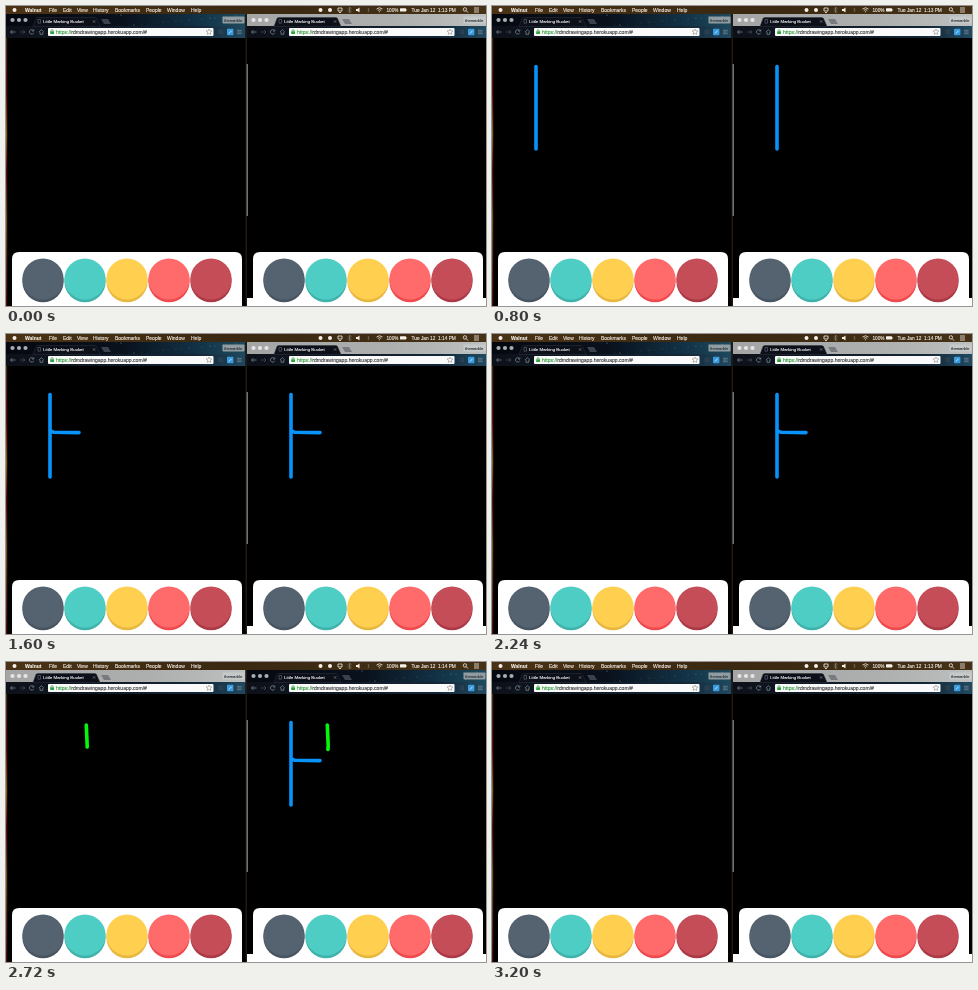
An HTML page for the animation above (6.56 s loop, 480 by 300 pixels).

```html
<!DOCTYPE html>
<html lang="en">
<head>
<meta charset="utf-8">
<title>Shared drawing</title>
<style>
html, body { margin: 0; width: 100%; height: 100%; overflow: hidden; background: #000; }
svg { display: block; width: 100vw; height: 100vh; }
text { font: 5px "Liberation Sans", Arial, sans-serif; white-space: pre; }
.stroke { fill: none; stroke-width: 3.6; stroke-linecap: round; stroke-linejoin: round; }
.icon { fill: none; stroke-width: .8; }
</style>
</head>
<body>
<svg id="stage" viewBox="0 0 480 300">
  <defs>
    <linearGradient id="menu"><stop stop-color="#4b3215"/><stop offset=".5" stop-color="#3a2811"/><stop offset="1" stop-color="#443116"/></linearGradient>
    <linearGradient id="desk" x2="0" y2="1">
      <stop stop-color="#4a2c12"/><stop offset=".2" stop-color="#6a120a"/><stop offset=".36" stop-color="#8f6420"/>
      <stop offset=".5" stop-color="#5c0f0a"/><stop offset=".68" stop-color="#7a5220"/><stop offset="1" stop-color="#4f0e0a"/>
    </linearGradient>
    <linearGradient id="stripOn"><stop stop-color="#05080f"/><stop offset=".5" stop-color="#0a121e"/><stop offset=".8" stop-color="#123246"/><stop offset="1" stop-color="#1d4a5c"/></linearGradient>
    <linearGradient id="stripOff"><stop stop-color="#a5a5a6"/><stop offset=".6" stop-color="#adaeae"/><stop offset="1" stop-color="#bcc0bf"/></linearGradient>
    <linearGradient id="bar"><stop stop-color="#0d1018"/><stop offset=".8" stop-color="#142636"/><stop offset="1" stop-color="#1f4a62"/></linearGradient>
  </defs>
</svg>
<script>
const LOOP = 6560, STEP = 160, OFFSET = 241;
const BLUE = "#0893fb", GREEN = "#05f80a";
const stage = document.getElementById("stage");

function add(parent, tag, attrs, content) {
  const el = document.createElementNS("http://www.w3.org/2000/svg", tag);
  for (const k in attrs) el.setAttribute(k, attrs[k]);
  if (content) el.textContent = content;
  return parent.appendChild(el);
}
const rect = (p, x, y, width, height, fill, rx = 0) => add(p, "rect", { x, y, width, height, fill, rx });
const dot = (p, cx, cy, r, fill) => add(p, "circle", { cx, cy, r, fill });
const icon = (p, d, stroke, width = .8) => add(p, "path", { d, stroke, class: "icon", style: `stroke-width:${width}` });
const label = (p, x, y, s, fill, size = 5, weight = 400) =>
  add(p, "text", { x, y, fill, stroke: fill, "stroke-width": .12, style: `font-size:${size}px;font-weight:${weight}` }, s);

function menuBar() {
  const ink = "#f6f0e8", dim = "#85796a";
  rect(stage, 0, 0, 480, 8, "url(#menu)");
  dot(stage, 8.5, 4, 2, ink);
  label(stage, 19, 5.6, "Walnut", ink, 5, 700);
  const items = { File: 43, Edit: 57, View: 71, History: 87, Bookmarks: 109, People: 140, Window: 161, Help: 185 };
  for (const name in items) label(stage, items[name], 5.6, name, ink);
  dot(stage, 314.5, 4, 2, ink);
  dot(stage, 324, 4, 2, ink);
  icon(stage, "M332 2h4v3h-4zM333 6.5h2", ink);
  icon(stage, "M342 2.5l3 3-1.5 1.5v-6l1.5 1.5-3 3", dim);
  add(stage, "path", { d: "M350 3h1.5l2-1.5v5l-2-1.5h-1.5z", fill: ink });
  icon(stage, "M362 2q2 2 0 4", dim);
  icon(stage, "M370.5 3q3-2.5 6 0M371.8 4.4q1.7-1.4 3.4 0M373 5.8h1", ink);
  label(stage, 380.5, 5.6, "100%", ink, 4.7);
  rect(stage, 394, 2.3, 6, 3.3, ink, .5);
  rect(stage, 400.3, 3.2, .6, 1.5, ink);
  label(stage, 405.5, 5.6, "Tue Jan 12", ink, 4.8);
  icon(stage, "M460.6 3.4a1.7 1.7 0 1 1-3.4 0a1.7 1.7 0 1 1 3.4 0M460.2 4.7l1.8 1.9", ink);
  icon(stage, "M468 2h5M468 4h5M468 6h5", ink);
  return label(stage, 432, 5.6, "", ink, 4.8);
}

// Window buttons and tab strip backdrop, the only parts that follow focus
function strip(win, on) {
  const g = add(win, "g", {});
  rect(g, 0, 8, 239.5, 13, on ? "url(#stripOn)" : "url(#stripOff)");
  if (on)
    for (let i = 0; i < 16; i++)
      dot(g, 110 + i * 47 % 128, 9 + i * 7 % 11, .3 + i % 3 * .12, "#5f8796");
  for (const x of [6.5, 13, 19.5]) dot(g, x, 14, 2.1, on ? "#a9aeb5" : "#e4e5e6");
  add(g, "path", { d: "M95 13h7l3 5h-7z", fill: on ? "#3b424e" : "#777b80" });
  rect(g, 216.5, 10.5, 22, 7, on ? "#8f9ca1" : "#c6c9c8", .8);
  label(g, 218, 15.5, "themarble", "#333a40", 4.1);
  return g;
}

function toolbar(g) {
  const ink = "#76838f", dim = "#3f4a56";
  rect(g, 0, 20, 239.5, 12, "url(#bar)");
  add(g, "path", {
    d: "M27 20.5L30 12.5Q30.5 11.5 32 11.5H88Q90 11.5 90.5 12.5L94 20.5Z",
    fill: "#0d1018", stroke: "#2c3340", "stroke-width": .5
  });
  icon(g, "M32 13.5h2.5v3.7H32z", "#8d98aa", .4);
  label(g, 37, 17.2, "Little Marking Bucket", "#eef0f4", 4.4);
  icon(g, "M87 14.4l2.2 2.2M89.2 14.4l-2.2 2.2", "#a6acb6", .5);
  icon(g, "M9.5 26h-5M6.5 24l-2 2 2 2", ink);
  icon(g, "M14 26h5M17 24l2 2-2 2", dim);
  icon(g, "M27.5 24.7a2.2 2.2 0 1 0 .2 2M27.8 23.5v1.6h-1.6", ink);
  icon(g, "M33 26l2.4-2.3 2.4 2.3M34 26v2.3h2.8V26", ink);
  rect(g, 42, 22, 165.5, 8, "#fafafa", 1);
  rect(g, 44.2, 25.2, 3.8, 2.9, "#2fa33c", .4);
  icon(g, "M45 25.2v-.8q1.1-1.6 2.2 0v.8", "#2fa33c");
  const url = label(g, 50, 27.6, "", "#3c3c3c", 5.08);
  add(url, "tspan", { fill: "#2c9a3a", stroke: "#2c9a3a" }, "https://");
  add(url, "tspan", {}, "rdmdrawingapp.herokuapp.com/#");
  icon(g, "M203 23l.9 1.8 2 .2-1.5 1.4.4 2-1.8-1-1.8 1 .4-2-1.5-1.4 2-.2z", "#777", .5);
  icon(g, "M213.3 24.2h3v3.4h-3z", dim);
  rect(g, 221, 22.8, 6.4, 6.4, "#3c9ade", .8);
  icon(g, "M223 27.4l2.6-2.7", "#f2f8fd");
  icon(g, "M231 24.3h4.6M231 26h4.6M231 27.7h4.6", ink);
}

function palette(win) {
  const colors = [["#556270", "#485562"], ["#4ecdc4", "#3fb3ab"], ["#ffd050", "#e8b740"],
                  ["#ff6b6b", "#f0494e"], ["#c44d58", "#ab3a46"]];
  add(win, "path", { d: "M6 300V253q0-7 7-7H229q7 0 7 7V300Z", fill: "#fff" });
  colors.forEach(([face, side], i) => {
    dot(win, 37 + 42 * i, 275.6, 20.6, side);
    dot(win, 37 + 42 * i, 273, 20.6, face);
  });
}

function makeWindow(x, bottom) {
  const g = add(stage, "g", { transform: `translate(${x})` });
  rect(g, 0, 32, 240, 268, "#000");
  rect(g, 0, 292, 239.5, 8, bottom);
  const on = strip(g, true), off = strip(g, false);
  toolbar(g);
  const stroke = color => add(g, "path", { class: "stroke", stroke: color });
  const win = { on, off, stem: stroke(BLUE), arm: stroke(BLUE), line: stroke(GREEN) };
  palette(g);
  return win;
}

const left = makeWindow(0, "#000"), right = makeWindow(OFFSET, "#fff");
rect(stage, 0, 32, 1.2, 268, "url(#desk)");
rect(stage, 239.5, 8, 1.5, 292, "#231910");
rect(stage, 240.6, 58, 1.2, 152, "#8d8d8d");
const clock = menuBar();

// Value at t along [time, value] keys, held at both ends
function along(keys, t) {
  if (t <= keys[0][0]) return keys[0][1];
  for (let i = 1; i < keys.length; i++) {
    const [a, u] = keys[i - 1], [b, v] = keys[i];
    if (t <= b) return u + (v - u) * (t - a) / (b - a);
  }
  return keys[keys.length - 1][1];
}

// Polyline cut where the chosen axis (0 = x, 1 = y) reaches the tip
function trace(points, axis, tip) {
  const out = [points[0]];
  for (let i = 1; i < points.length; i++) {
    const p = points[i - 1], q = points[i];
    if (q[axis] >= tip) {
      const k = (tip - p[axis]) / (q[axis] - p[axis]);
      out.push([p[0] + (q[0] - p[0]) * k, p[1] + (q[1] - p[1]) * k]);
      break;
    }
    out.push(q);
  }
  return "M" + out.join("L");
}

const STEM = [[44, 60.5], [44, 143]];
const ARM = [[44.5, 96.8], [48, 98.3], [73, 98.6]];
const LINE = [[80.3, 63], [81.2, 84], [80, 98], [82.5, 106], [82.3, 125]];
const stemTip = [[160, 66], [320, 87], [480, 111], [640, 134], [800, 143]];
const armTip = [[960, 50], [1120, 59.5], [1280, 66], [1440, 73]];
const lineTip = [[2560, 68], [2720, 85], [2880, 104], [3040, 122]];

function show(el, visible, d) {
  el.style.display = visible ? "" : "none";
  if (d) el.setAttribute("d", d);
}

function render(now) {
  const t = Math.floor(now % LOOP / STEP) * STEP;
  const live = t < 3200, swapped = t >= 2400 && live;
  clock.textContent = t >= 1600 && live ? "1:14 PM" : "1:13 PM";
  for (const win of [left, right]) {
    const isLeft = win === left, focused = isLeft !== swapped;
    const kept = live && (!isLeft || t < 2080);
    show(win.on, focused);
    show(win.off, !focused);
    show(win.stem, kept && t >= 160, trace(STEM, 1, along(stemTip, t)));
    show(win.arm, kept && t >= 960, trace(ARM, 0, along(armTip, t)));
    show(win.line, live && t >= 2560, trace(LINE, 1, along(lineTip, t) + (isLeft ? 0 : 2.5)));
  }
}

const start = performance.now();
function frame() {
  render(performance.now() - start);
  requestAnimationFrame(frame);
}
frame();
</script>
</body>
</html>
```
